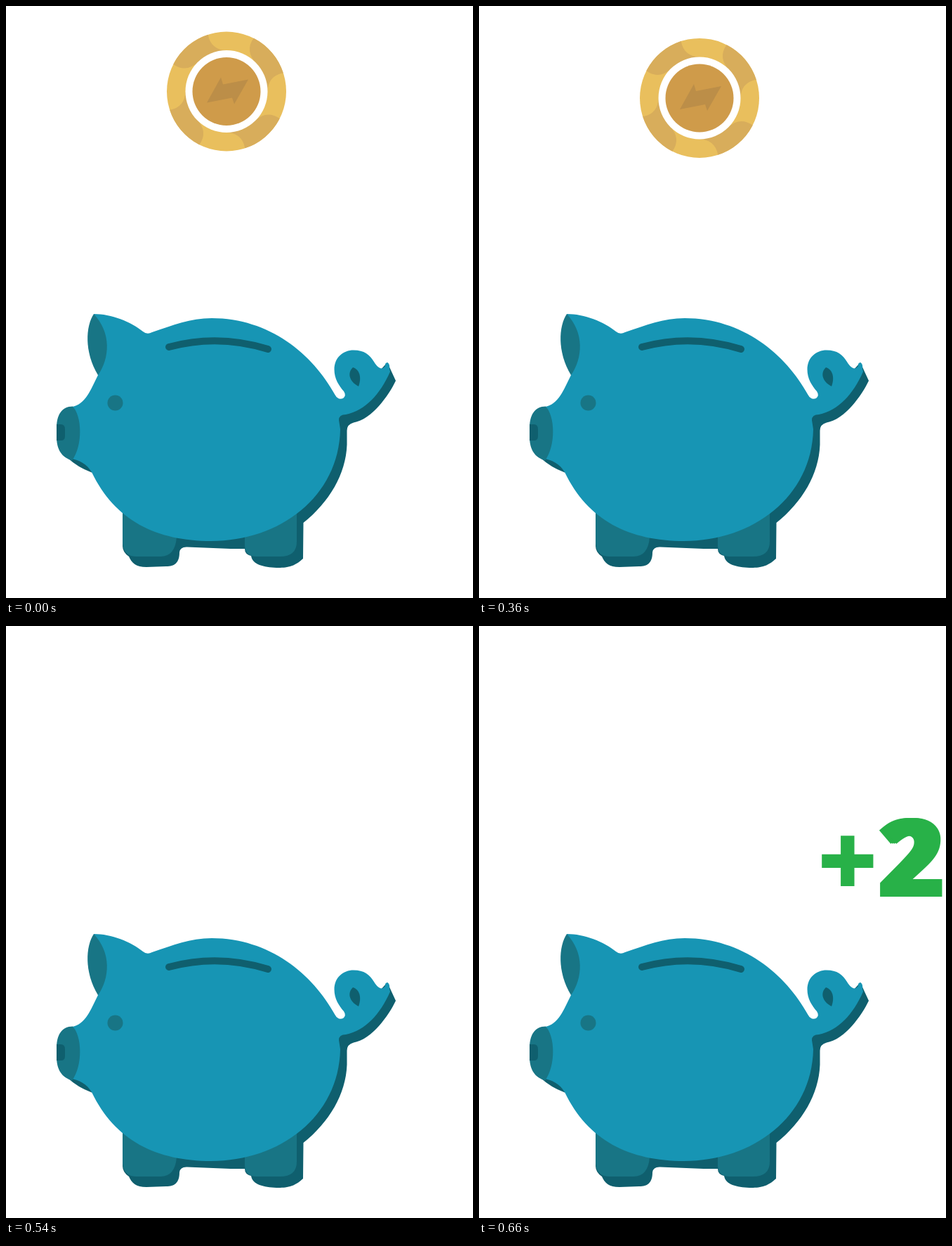
Animation of 665 by 842 pixels, one loop 1.19 s. Source, as an HTML page with a canvas:

```html
<!DOCTYPE html>
<html lang="en">
<head>
<meta charset="utf-8">
<title>Piggy bank</title>
<style>
  html, body { margin: 0; width: 100%; height: 100%; overflow: hidden; background: #fff; }
  canvas { display: block; width: 665px; height: 842px; }
</style>
</head>
<body>
<canvas id="stage" width="665" height="842"></canvas>
<script>
const ctx = document.getElementById('stage').getContext('2d');
const LOOP = 1190;
const STEPS = [0, 130, 230, 360, 390, 420, 450, 480, 510, 540, 570, 600, 630, 660];
const LAND = 9, SQUASH = 10, REST = 13;
const GROUND = 798;

const LIGHT = '#1795b4', MID = '#187585', DARK = '#0f5f6e';
const GOLD = '#e9bf5d', TAN = '#d8ad5b', BRONZE = '#cf9b4a', BOLT = '#bc8e48';
const GREEN = '#28b148';

const shade = new Path2D(`M543 507 L555 533 C545 554 521 588 495 592.5 Q485.5 595 485.5 604
  L485.5 624 C484 666 460 706 423.5 735 L423 786 C410 798 400 799 385 799
  C367 798 351 795 349 782 Q340 780 340 772 H320 L258 769.5 Q248 769 247 777
  C247 792 240 797 228 797 L200 798 C185 798 179 792 175 783 Q166 777 166 768
  V723 H292 L476 580 Z`);
const mouth = new Path2D('M88 643 Q102 656 122 663.5 L130 660 L105 635 Z');
const legs = new Path2D(`M166 715 V765 Q168 783 186 783 H220 Q241 783 243 755 V715 Z
  M340 740 V768 Q341 783 357 783 H390 Q414 783 414 762 V710 Z`);
const body = new Path2D(`M125 438 C150 438 178 449 195 463 Q201 468 208 464
  C238 454 262 444 293 444 C375 444 437 495 468.5 553 Q473 561 480 558
  Q485 554 481 548 C474 540 467.5 530 467.5 517 C467.5 500 480 489.5 495 489.5
  C510 489.5 518 496 524 506 C530 516 536 518 540 512 Q539 508 543 507
  Q547 509 546 516 L547 520 C533 552 512 575 484 581 Q474 581 474 589
  L476 602 C474 698 390 761 292 761 C215 761 155 732 122 663
  C115 651 103 645 92 644 L94 570 C113 567 121 545 131 525 Z`);
const ear = new Path2D('M125 438 C113.5 455 111 492 131 525 C148 500 150 465 125 438 Z');
const snout = new Path2D(`M95 570 C108 582 110 625 94 646.5 C80 642 72 632 72 612
  V601 C72 582 79 569.5 95 569.5 Z`);
const nostril = new Path2D('M72 595 H78 Q84 595 84 602 V612 Q84 618 78 618 H72 Z');
const curl = new Path2D('M494 514 C486 521 488 534 502 541 C506 530 505 518 494 514 Z');
const slot = new Path2D('M232 485 Q302 466 373 488');
const bolt = new Path2D('M-8 -20 L-5 -10 L31 -17 L11 18 L8 9 L-28 16 Z');

function fill(path, color) {
  ctx.fillStyle = color;
  ctx.fill(path);
}

function disc(x, y, r, color) {
  ctx.fillStyle = color;
  ctx.beginPath();
  ctx.arc(x, y, r, 0, Math.PI * 2);
  ctx.fill();
}

function drawPig(scaleY) {
  ctx.save();
  ctx.translate(0, GROUND);
  ctx.scale(1, scaleY);
  ctx.translate(0, -GROUND);
  fill(shade, DARK);
  fill(mouth, DARK);
  fill(legs, MID);
  fill(body, LIGHT);
  fill(ear, MID);
  fill(snout, MID);
  fill(nostril, DARK);
  fill(curl, DARK);
  disc(155.5, 564.5, 11, MID);
  ctx.strokeStyle = DARK;
  ctx.lineWidth = 10;
  ctx.lineCap = 'round';
  ctx.stroke(slot);
  ctx.restore();
}

const polar = (r, deg) => {
  const a = deg * Math.PI / 180;
  return [r * Math.cos(a), r * Math.sin(a)];
};

// One curved rim patch, spanning an eighth of the coin.
function rimPatch(deg) {
  const end = deg + 45, rad = Math.PI / 180;
  ctx.beginPath();
  ctx.moveTo(...polar(58, deg + 20));
  ctx.quadraticCurveTo(...polar(63, deg - 3), ...polar(85, deg));
  ctx.arc(0, 0, 85, deg * rad, end * rad);
  ctx.quadraticCurveTo(...polar(63, end - 3), ...polar(58, end + 20));
  ctx.closePath();
  ctx.fill();
}

function drawCoin(y) {
  ctx.save();
  ctx.translate(314, y);
  disc(0, 0, 85, GOLD);
  ctx.fillStyle = TAN;
  for (let k = 0; k < 4; k++) rimPatch(-63 + 90 * k);
  disc(0, 0, 58.5, '#fff');
  disc(0, 0, 48.5, BRONZE);
  fill(bolt, BOLT);
  ctx.restore();
}

function drawGlyph(text, x, y, size) {
  ctx.font = `800 ${size}px "Open Sans", sans-serif`;
  ctx.fillText(text, x, y);
}

function drawGain(size) {
  ctx.fillStyle = GREEN;
  drawGlyph('+', 483, 386, size * 0.955);
  // Overprinting makes the digit heavier than the sign.
  for (let k = 0; k < 4; k++) drawGlyph('2', 487.5 + size * (0.51 + k * 0.017), 385, size);
}

const coinY = step => 121.5 + 1.845 * (1.83 ** step - 1);
const gainSize = step => 88 + 67 * 2.65 ** (step - REST);

function draw(time) {
  const step = STEPS.findLastIndex(t => t <= time);
  ctx.fillStyle = '#fff';
  ctx.fillRect(0, 0, 665, 842);
  if (step < LAND) drawCoin(coinY(step));
  drawPig(step >= SQUASH && step < REST ? 0.882 : 1);
  if (step >= SQUASH) drawGain(gainSize(step));
}

const start = performance.now();
function tick() {
  draw((performance.now() - start) % LOOP);
  requestAnimationFrame(tick);
}
tick();
</script>
</body>
</html>
```
